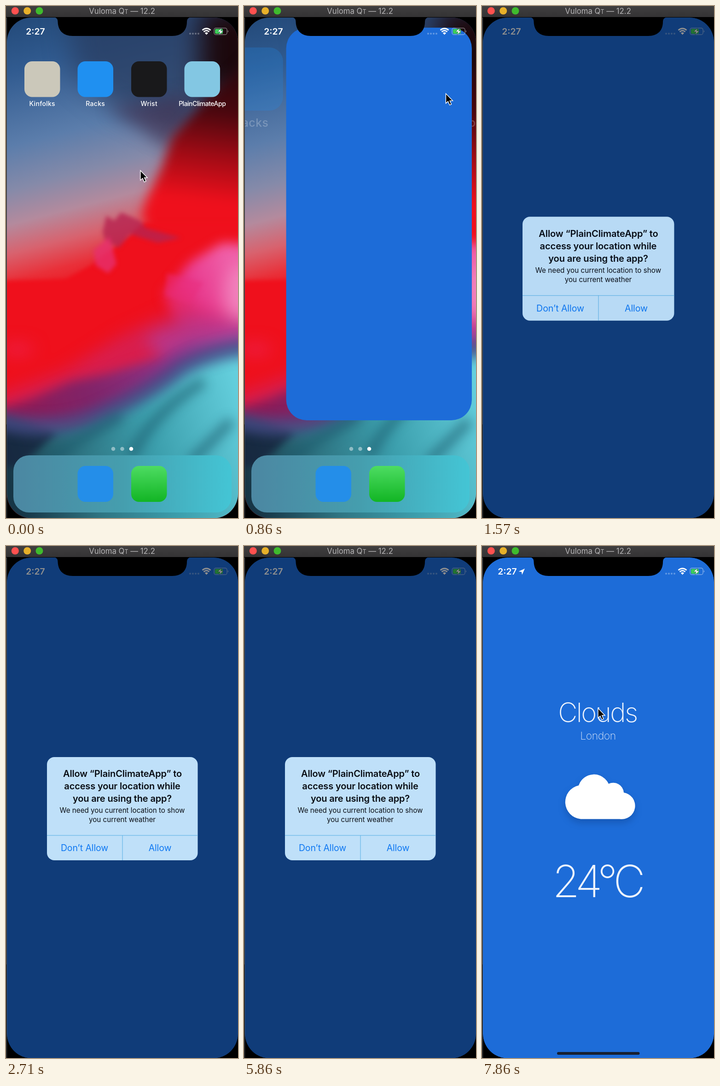
An HTML page that plays this animation: 504x1111 px, repeating every 8000 ms.

```html
<!DOCTYPE html>
<html lang="en">
<head>
<meta charset="utf-8">
<title>Weather app launch</title>
<style>
  html, body { margin: 0; width: 100%; height: 100%; overflow: hidden; background: #000; }
  svg { display: block; width: 100vw; height: 100vh; }
  text { font-family: Inter, Roboto, sans-serif; text-anchor: middle; }
  .label { font-size: 14px; font-weight: 500; fill: #fff; letter-spacing: .3px; }
  .head { font-size: 20px; font-weight: 600; letter-spacing: -.15px; }
  .body { font-size: 15.2px; }
  .button { font-size: 19.5px; fill: #0f78f2; letter-spacing: -.1px; }
  .thin { font-weight: 200; fill: #eef4fd; }
</style>
</head>
<body>
<svg viewBox="0 0 504 1111" xmlns="http://www.w3.org/2000/svg">
  <defs>
    <clipPath id="screen"><rect x="2" y="25" width="502" height="1086.500" rx="53"/></clipPath>
    <clipPath id="panel"><rect x="89" y="458" width="327.500" height="224" rx="16"/></clipPath>
    <linearGradient id="bar" x2="0" y2="1">
      <stop stop-color="#403f40"/><stop offset="1" stop-color="#343334"/>
    </linearGradient>
    <linearGradient id="sky" gradientUnits="userSpaceOnUse" x1="150" y1="0" x2="410" y2="1000">
      <stop stop-color="#244b7b"/><stop offset=".1" stop-color="#315b90"/>
      <stop offset=".25" stop-color="#5b7dab"/><stop offset=".34" stop-color="#858aa9"/>
      <stop offset=".41" stop-color="#b48a9d"/><stop offset=".47" stop-color="#d8626e"/>
      <stop offset=".525" stop-color="#e93039"/><stop offset=".59" stop-color="#ef101a"/>
    </linearGradient>
    <linearGradient id="ember" gradientUnits="userSpaceOnUse" x1="440" y1="90" x2="400" y2="420">
      <stop stop-color="#1c070b"/><stop offset=".4" stop-color="#48070e"/>
      <stop offset=".7" stop-color="#a00b15"/><stop offset="1" stop-color="#ef101c"/>
    </linearGradient>
    <linearGradient id="rose" gradientUnits="userSpaceOnUse" x1="330" y1="680" x2="504" y2="600">
      <stop stop-color="#e02a70" stop-opacity=".5"/><stop offset=".5" stop-color="#e8388c"/>
      <stop offset="1" stop-color="#ef5fa8"/>
    </linearGradient>
    <linearGradient id="plum" gradientUnits="userSpaceOnUse" x1="0" y1="860" x2="504" y2="720">
      <stop stop-color="#8c1a54"/><stop offset=".35" stop-color="#802469"/>
      <stop offset=".7" stop-color="#8e3488"/><stop offset="1" stop-color="#a64a9e"/>
    </linearGradient>
    <linearGradient id="sea" gradientUnits="userSpaceOnUse" x1="0" y1="1000" x2="504" y2="820">
      <stop stop-color="#173646"/><stop offset=".3" stop-color="#2f7583"/>
      <stop offset=".6" stop-color="#3c9fad"/><stop offset="1" stop-color="#64cfdd"/>
    </linearGradient>
    <linearGradient id="dock">
      <stop stop-color="#4c87a2"/><stop offset=".5" stop-color="#459eae"/><stop offset="1" stop-color="#44c5d5"/>
    </linearGradient>
    <linearGradient id="mint" x2="0" y2="1">
      <stop stop-color="#4ddc62"/><stop offset="1" stop-color="#12b524"/>
    </linearGradient>
    <g id="blurs"></g>
  </defs>

  <rect width="504" height="1111"/>
  <path d="M.5 25V908" stroke="#2c2c2c"/>
  <path d="M1.500 25V1111" stroke="#555"/>

  <g clip-path="url(#screen)">
    <g id="home">
      <rect y="20" width="504" height="1091" fill="url(#sky)"/>
      <g filter="url(#b28)">
        <path d="M130 0H540V190L410 290L330 260L230 215L150 150Z" fill="#293c60" opacity=".75"/>
        <path d="M425 0H560V180L420 190Z" fill="#1c080c"/>
      </g>
      <path d="M220 222L400 190L385 270L345 310L300 270Z" fill="#45304f" opacity=".6" filter="url(#b18)"/>
      <path d="M540 100L440 195L360 285L338 350L305 420L294 455L330 520H540Z" fill="url(#ember)" filter="url(#b12)"/>
      <path d="M-30 597L130 592L185 562L240 520L300 470H540V800H-30V597M-30 790H540V900H-30Z" fill="#ef101c" filter="url(#b5)"/>
      <path d="M540 517L470 514L400 555L340 625L370 690L540 740Z" fill="url(#rose)" filter="url(#b12)"/>
      <g filter="url(#b18)">
        <ellipse cx="512" cy="625" rx="36" ry="65" fill="#f28cc2" opacity=".8"/>
        <ellipse cx="25" cy="745" rx="35" ry="10" fill="#ee2352"/>
        <path d="M-30 850L130 790L250 715L390 650L540 690V790L350 810L90 920L-30 900Z" fill="#cc2668" opacity=".65"/>
        <path d="M300 720L400 680L540 690V760L360 790Z" fill="#b23c98" opacity=".8"/>
      </g>
      <path d="M-30 880L60 850L140 815L220 798L330 765L400 725L540 700V790L350 830L200 900L90 920L-30 900Z" fill="url(#plum)" filter="url(#b12)"/>
      <g filter="url(#b5)">
        <path d="M210 490L218 455L235 466L250 448L292 466L304 482L380 503L330 514L270 495L245 525L215 508Z" fill="#b62450" opacity=".8"/>
        <path d="M190 530L225 500L240 560L222 580L195 563Z" fill="#e6306f" opacity=".8"/>
        <path d="M350 580L345 628L400 645L430 600Z" fill="#ea2c7c" opacity=".5"/>
      </g>
      <g filter="url(#b8)">
        <path d="M-30 885Q90 935 190 893Q310 842 380 785Q440 750 540 735V1150H-30Z" fill="url(#sea)"/>
        <path d="M-30 890Q50 900 110 925L30 1000H-30Z" fill="#17263f" opacity=".85"/>
      </g>
      <path d="M-30 895Q90 930 190 892Q310 842 380 785Q440 750 540 738" fill="none" stroke="#454c88" stroke-width="40" opacity=".8" filter="url(#b12)"/>
      <g filter="url(#b12)" fill="none" stroke="#1b596b" stroke-width="22" opacity=".6">
        <path d="M430 815Q320 880 270 980"/><path d="M250 890Q140 950 90 990"/><path d="M490 900L400 990"/>
      </g>
      <g id="icons"></g>
      <g fill="#fff">
        <circle cx="233" cy="961" r="4.300" opacity=".45"/><circle cx="252.500" cy="961" r="4.300" opacity=".45"/>
        <circle cx="272" cy="961" r="4.300"/>
      </g>
      <rect x="16" y="975" width="474" height="124" rx="34" fill="url(#dock)"/>
      <rect x="155.500" y="998" width="77.500" height="78" rx="17" fill="#248ee9"/>
      <rect x="272" y="998" width="77.500" height="78" rx="17" fill="url(#mint)"/>
    </g>

    <rect id="app"/>
    <g id="weather">
      <text class="thin" x="251" y="381.500" font-size="58" letter-spacing="-2.500">Clouds</text>
      <text class="thin" x="252" y="420" font-size="23" letter-spacing="-.5" opacity=".9">London</text>
      <use href="#cloud" y="8" style="fill:#0b3c85" opacity=".4" filter="url(#b8)"/>
      <use href="#cloud" style="fill:#fff"/>
      <text class="thin" x="250" y="762" font-size="96" letter-spacing="-8">24°C</text>
    </g>
    <rect id="grip" x="163" y="1098" width="179.500" height="6" rx="3" fill="#171f30"/>

    <g fill="#fff">
      <text id="clock" y="62" font-size="19.300" font-weight="600">2:27</text>
      <path id="arrow" d="M93 49L79.500 55.300L86 56.300L87 62.500Z"/>
      <g opacity=".3">
        <circle cx="400" cy="60" r="2"/><circle cx="406" cy="60" r="2"/>
        <circle cx="412" cy="60" r="2"/><circle cx="418" cy="60" r="2"/>
      </g>
      <path d="M435.500 62.500L431.800 58.500Q435.500 55.500 439.200 58.500Z"/>
      <path d="M429.500 56Q435.500 50.800 441.500 56M426.500 52.500Q435.500 45 444.500 52.500" fill="none" stroke="#fff" stroke-width="2.800"/>
      <rect x="452" y="47.800" width="28" height="14.400" rx="4" fill="none" stroke="#fff" stroke-opacity=".5" stroke-width="1.200"/>
      <path d="M481.800 52.500Q484.500 55 481.800 57.500Z" opacity=".55"/>
      <rect x="454" y="49.800" width="17" height="10.400" rx="2.200" fill="#3dcf58"/>
      <path d="M468 48L459.500 56H465L463 62.500L472 54H466.500Z" stroke="#276a55" stroke-width=".8"/>
    </g>

    <rect id="dim" width="504" height="1111"/>
    <g id="alert">
      <g clip-path="url(#panel)">
        <rect x="88" y="457" width="330" height="226" fill="#bfe0f9"/>
        <rect id="tap" x="253" y="628" width="165" height="56" fill="#94bddc"/>
        <path d="M88 628H418M253 628V684" stroke="#55aee4"/>
      </g>
      <g fill="#090d14">
        <text class="head" x="253" y="501">Allow “PlainClimateApp” to</text>
        <text class="head" x="252.500" y="528">access your location while</text>
        <text class="head" x="252.500" y="555">you are using the app?</text>
        <text class="body" x="252.500" y="579">We need you current location to show</text>
        <text class="body" x="252.500" y="598.500">you current weather</text>
      </g>
      <text class="button" x="170.500" y="662">Don’t Allow</text>
      <text class="button" x="334.500" y="662">Allow</text>
    </g>
  </g>

  <path d="M104 24.500Q112.500 25 112.500 34C113 54 125 65 145 65H361C381 65 393 54 393 34Q393 25 402 24.500Z"/>
  <rect width="504" height="24" fill="url(#bar)"/>
  <circle cx="19.800" cy="10.500" r="8" fill="#ff514f"/>
  <circle cx="46.200" cy="10.500" r="8" fill="#e7b02a"/>
  <circle cx="72.500" cy="10.500" r="8" fill="#3fbb2e"/>
  <text x="252" y="17" font-size="16.800" fill="#b5b4b5">Vuloma Q<tspan font-size="12.500">T</tspan> — 12.2</text>
  <path id="cursor" d="M0 0V21L4.800 16.800L8.300 24.800L12 23.200L8.600 15.500H15Z" stroke="#fff" stroke-width="1.400"/>
  <defs>
    <path id="cloud" d="M214.500 592.500A37 37 0 0 1 210 519.500A35 35 0 0 1 275 516A23 23 0 0 1 308 535A29 29 0 0 1 299 592.500Z"/>
  </defs>
</svg>
<script>
const LOOP = 8000, RATE = 7;
const $ = id => document.getElementById(id);
const clamp = x => Math.min(1, Math.max(0, x));
const ramp = (t, a, b) => clamp((t - a) / (b - a));
const mix = (a, b, p) => a + (b - a) * p;
const smooth = p => p * p * (3 - 2 * p);
const easeOut = p => 1 - (1 - p) ** 3;
const show = (id, opacity) => $(id).setAttribute('opacity', opacity);
const set = (el, attrs) => Object.entries(attrs).forEach(([k, v]) => el.setAttribute(k, v));

$('blurs').innerHTML = [5, 8, 12, 18, 28].map(s =>
  `<filter id="b${s}" filterUnits="userSpaceOnUse" x="-80" y="-80" width="664" height="1290"
    color-interpolation-filters="sRGB"><feGaussianBlur stdDeviation="${s}"/></filter>`).join('');

$('icons').innerHTML = [
  ['Kinfolks', 40, '#cbc8ba'],
  ['Racks', 155.5, '#1f90f1'],
  ['Wrist', 272, '#19191b'],
  ['PlainClimateApp', 387.5, '#83c7e3', '-.5px'],
].map(([name, x, color, spacing = '.3px']) =>
  `<rect x="${x}" y="120" width="77.500" height="77.500" rx="17" fill="${color}"/>
   <text class="label" x="${x + 38.75}" y="217" style="letter-spacing:${spacing}">${name}</text>`).join('') +
  '<rect id="press" x="387.500" y="120" width="77.500" height="77.500" rx="17"/>';

// pointer path: [start, end, from, to]
const moves = [
  [0, 430, [292, 357], [424, 183]],
  [760, 1200, [424, 183], [540, 240]],
  [5900, 6350, [540, 590], [334, 648]],
  [6780, 7560, [334, 648], [252, 352]],
];

function pointer(t) {
  const [a, b, from, to] = moves.filter(m => m[0] <= t).pop();
  const p = smooth(ramp(t, a, b));
  return [mix(from[0], to[0], p), mix(from[1], to[1], p)];
}

function launch(t) {
  const p = easeOut(ramp(t, 680, 1140)), q = clamp(p * 2);
  set($('app'), {
    x: mix(387.5, 2, p), y: mix(120, 25, p),
    width: mix(77.5, 502, p), height: mix(77.5, 1086.5, p), rx: mix(17, 53, p),
    fill: `rgb(${mix(131, 29, q)},${mix(199, 108, q)},${mix(227, 216, q)})`,
    opacity: t < 680 ? 0 : 1,
  });
  set($('icons'), {
    opacity: 1 - p,
    transform: `translate(426 159) scale(${1 + p}) translate(-426 -159)`,
  });
  $('home').style.display = p === 1 ? 'none' : '';
  show('press', t >= 420 && t < 680 ? .38 : 0);
}

function dialog(t) {
  const open = t < 1360 ? 0 : 1 - Math.exp((1360 - t) / 64);
  const gone = 1 - ramp(t, 6600, 6860);
  const scale = 1 + .16 * (1 - open);
  const dim = ramp(t, 1360, 1560) * gone;
  show('dim', .44 * dim);
  show('alert', open * gone);
  $('alert').setAttribute('transform',
    `translate(252.700 570) scale(${scale}) translate(-252.700 -570)`);
  show('tap', t >= 6400 && t < 6720 ? 1 : 0);
  show('grip', ramp(t, 1000, 1140) * (1 - dim));
}

function draw(t) {
  launch(t);
  dialog(t);
  const located = t >= 6990;
  show('arrow', located ? 1 : 0);
  $('clock').setAttribute('x', located ? 55 : 64);
  show('weather', t >= 7270 ? 1 : 0);
  $('cursor').setAttribute('transform', `translate(${pointer(t)})`);
}

const start = performance.now();
function tick() {
  const t = (performance.now() - start) % LOOP;
  draw(Math.floor((t + 3) * RATE / 1000) * 1000 / RATE);
  requestAnimationFrame(tick);
}
tick();
</script>
</body>
</html>
```
